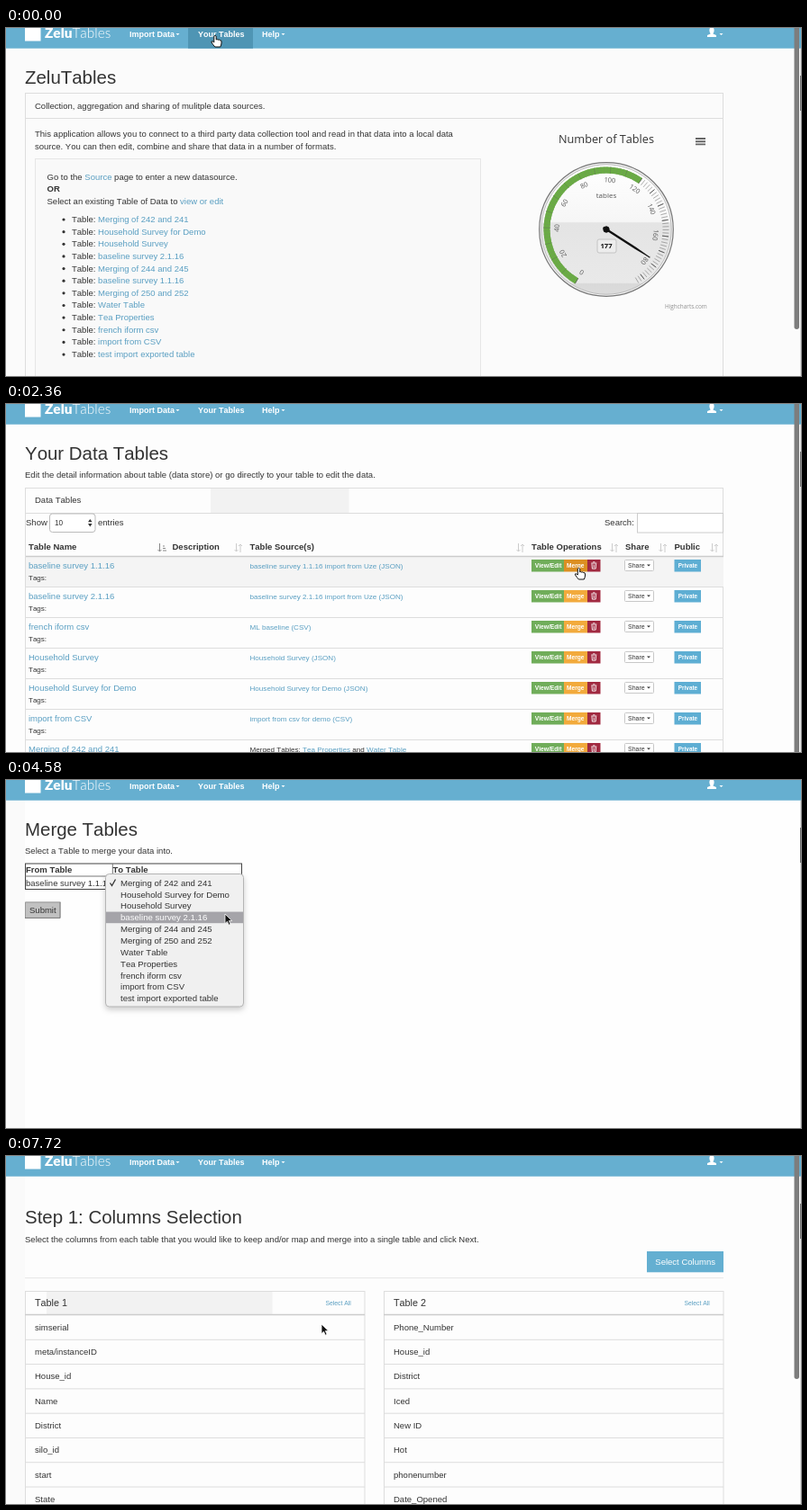
An HTML page for the animation above (8 s loop, 882 px wide and 387 px high).

```html
<!DOCTYPE html>
<html lang="en">
<head>
<meta charset="utf-8">
<title>ZeluTables</title>
<style>
html, body { margin: 0; width: 100%; height: 100%; overflow: hidden; background: #fdfdfd; }
svg { display: block; width: 882px; height: 387px; font: 9.53px "Liberation Sans", Arial, sans-serif; font-kerning: none; white-space: pre; }
.chart { font-family: "Open Sans", "Noto Sans", sans-serif; }
.logo { font-family: Lato, sans-serif; }
</style>
</head>
<body>
<svg id="stage" viewBox="0 0 882 387"></svg>
<script>
const INK = '#333', LINK = '#5a9fc2', BLUE = '#64afd1', LINE = '#ddd';
const stage = document.getElementById('stage');
const $ = id => document.getElementById(id);

const text = (x, y, s, fill = INK, size = 9.53, more = '') =>
  `<text x="${x}" y="${y}" fill="${fill}" font-size="${size}" ${more}>${s}</text>`;
const bold = (x, y, s, fill, size) => text(x, y, s, fill, size, 'font-weight="700"');
const rect = (x, y, w, h, fill, more = '') =>
  `<rect x="${x}" y="${y}" width="${w}" height="${h}" fill="${fill}" ${more}/>`;
const box = (x, y, w, h, stroke = LINE, fill = 'none', rx = 0) =>
  rect(x, y, w, h, fill, `stroke="${stroke}" rx="${rx}"`);
const path = (d, fill, more = '') => `<path d="${d}" fill="${fill}" ${more}/>`;
const rule = (d, stroke = LINE, width = 1) => path(d, 'none', `stroke="${stroke}" stroke-width="${width}"`);
const span = (s, fill = LINK) => `<tspan fill="${fill}">${s}</tspan>`;
const title = (y, s) => text(21, y, s, INK, 20.45);
const group = (id, s, more = '') => `<g id="${id}" ${more}>${s}</g>`;
const caret = (x, y, fill, r = 2) => path(`M${x} ${y}h${2 * r}l${-r} ${r}z`, fill);
const upDown = (x, y) => path(`M${x} ${y}l2.3-3.4 2.3 3.4zm0 1.8h4.6l-2.3 3.4z`, INK);
const list = (n, f) => Array.from({ length: n }, (_, i) => f(i)).join('');

function navbar() {
  return rect(0, 0, 882, 22.7, '#66afd0') +
    rect(202, 0, 72, 22.7, '#4f95b4', 'id="navHover"') +
    rect(21, 0, 17.5, 14.5, '#fff') +
    `<text x="43" y="11.3" fill="#fff" font-size="15.4" class="logo"><tspan font-weight="900">Zelu</tspan><tspan font-weight="300">Tables</tspan></text>` +
    bold(137, 9.7, 'Import Data', '#fff', 9) + caret(188.5, 6, '#fff') +
    bold(213, 9.7, 'Your Tables', '#fff', 9) +
    bold(284, 9.7, 'Help', '#fff', 9) + caret(305.5, 6, '#fff') +
    '<ellipse cx="783" cy="2.6" rx="2.6" ry="3.6" fill="#fff"/>' +
    path('M781.5 5h3v1.5l3.5 1.5v2h-10v-2l3.5-1.5z', '#fff') + caret(791.5, 6, '#fff') +
    rect(881, 23, 1, 364, '#d8d8d8') + rect(881, 53, 1, 39, '#666') +
    rect(874.5, -6, 5.5, 0, '#7d7d7d', 'rx="2.7" id="thumb"');
}

function gauge() {
  const cx = 666, cy = 224;
  const angle = v => -150 + v * 300 / 194.7;
  const at = (r, v) => {
    const a = angle(v) * Math.PI / 180;
    return `${(cx + r * Math.sin(a)).toFixed(2)} ${(cy - r * Math.cos(a)).toFixed(2)}`;
  };
  const ring = (r, fill, stroke, w = 1) =>
    `<circle cx="${cx}" cy="${cy}" r="${r}" fill="${fill}" stroke="${stroke}" stroke-width="${w}"/>`;
  const ticks = (n, step, color, w) =>
    rule(list(n, i => `M${at(62.5, i * step)}L${at(69.5, i * step)}`), color, w);
  const band = color => rule(`M${at(66, 0)}A66 66 0 1 1 ${at(66, 120)}`, color, 7);
  const labels = list(10, i => {
    const [x, y] = at(55, i * 20).split(' ');
    return text(0, 2.6, i * 20, '#555', 7.4,
      `text-anchor="middle" transform="translate(${x} ${y}) rotate(${angle(i * 20)})"`);
  });
  return `<defs><linearGradient id="dial" x2="0" y2="1">
    <stop offset="0" stop-color="#fff"/><stop offset=".44" stop-color="#f6f6f6"/>
    <stop offset=".45" stop-color="#e4e4e4"/><stop offset=".91" stop-color="#e9e9e9"/>
    <stop offset=".92" stop-color="#d9d9d9"/><stop offset="1" stop-color="#dcdcdc"/></linearGradient></defs>` +
    text(cx, 128, 'Number of Tables', INK, 12.7, 'text-anchor="middle"') +
    rule('M765 123h11m-11 3.2h11m-11 3.2h11', '#666', 1.9) +
    ring(74.3, '#f4f4f4', '#777', 1.2) + ring(72.2, 'url(#dial)', '#bbb') +
    band('#6aad45') + ticks(98, 2, '#777', .6) + ticks(20, 10, '#555', .9) + band('#6aad45b0') +
    labels + text(cx, 189, 'tables', '#555', 8, 'text-anchor="middle"') +
    box(656, 235, 21, 15, '#c4c4c4', '#ededed', 2) +
    bold(659.5, 245.3, '177', '#111', 7.6) +
    `<g transform="translate(${cx} ${cy}) rotate(${angle(177)})">${path('M-1.2 4V-38L-.4-57H.4L1.2-38V4z', '#111')}</g>` +
    ring(3.2, '#111', '#111') +
    text(731, 312.3, 'Highcharts.com', '#909090', 6.4);
}

function home() {
  const names = ['Merging of 242 and 241', 'Household Survey for Demo', 'Household Survey', 'baseline survey 2.1.16',
    'Merging of 244 and 245', 'baseline survey 1.1.16', 'Merging of 250 and 252', 'Water Table', 'Tea Properties',
    'french iform csv', 'import from CSV', 'test import exported table'];
  return rect(0, 0, 882, 387, '#fbfbfb') + title(62, 'ZeluTables') +
    box(21.5, 72.5, 774, 330) + rule('M21 100.5h775') +
    text(32, 89.7, 'Collection, aggregation and sharing of mulitple data sources.') +
    text(32, 121, 'This application allows you to connect to a third party data collection tool and read in that data into a local data') +
    text(32, 134.7, 'source. You can then edit, combine and share that data in a number of formats.') +
    box(32.5, 145.5, 494, 260, '#e6e6e6', '#f9f9f9') +
    text(45.5, 168.7, `Go to the ${span('Source')} page to enter a new datasource.`) +
    bold(45.5, 182.2, 'OR') +
    text(45.5, 195.8, `Select an existing Table of Data to ${span('view or edit')}`) +
    names.map((n, i) => {
      const y = 216 + i * 13.64;
      return `<circle cx="64" cy="${y - 3}" r="1.6" fill="${INK}"/>` + text(73, y, `Table: ${span(n)}`);
    }).join('') +
    group('gauge', gauge(), 'class="chart"');
}

function tableRow([name, source], i) {
  const y = 34 * i;
  const src = i < 6 ? span(source) : `Merged Tables: ${span('Tea Properties')} and ${span('Water Table')}`;
  return text(25, 182.7 + y, name, LINK) + text(25, 195.7 + y, 'Tags:', INK, 8) +
    text(270.5, 182.7 + y, src, INK, 8.1, `id="src${i}"`) +
    rect(583, 173 + y, 36, 13.5, '#70ad5a') + rect(619, 173 + y, 26, 13.5, '#f2aa3c', `id="merge${i}"`) +
    rect(645, 173 + y, 14.5, 13.5, '#a12a41') +
    bold(586.7, 182.3 + y, 'View/Edit', '#fff', 6.7) + bold(622, 182.3 + y, 'Merge', '#fff', 6.6) +
    rule(`M649.3 ${177 + y}h6m-4-1.2h2m-3.3 1.7l.4 5.6h3.8l.4-5.6m-2.3 1v3.5`, '#fff', .9) +
    box(686.5, 173.5 + y, 32, 12, '#c8c8c8', '#fff', 1) + text(690, 181.6 + y, 'Share', INK, 7) +
    caret(711, 178.5 + y, INK) +
    rect(741.5, 173 + y, 29.5, 13.5, '#5eaed3') + bold(745.8, 182.2 + y, 'Private', '#fff', 6.4) +
    rule(`M22 ${203.5 + y}h774`);
}

function tables() {
  const rows = [['baseline survey 1.1.16', 'baseline survey 1.1.16 import from Uze (JSON)'],
    ['baseline survey 2.1.16', 'baseline survey 2.1.16 import from Uze (JSON)'],
    ['french iform csv', 'ML baseline (CSV)'], ['Household Survey', 'Household Survey (JSON)'],
    ['Household Survey for Demo', 'Household Survey for Demo (JSON)'],
    ['import from CSV', 'import from csv for demo (CSV)'], ['Merging of 242 and 241', '']];
  const heads = [[25, 'Table Name'], [184.5, 'Description'], [270.5, 'Table Source(s)'], [583, 'Table Operations'],
    [687, 'Share'], [741.5, 'Public']];
  const sorter = x => rule(`M${x + 2.5} 155v9m-2-2l2 2 2-2M${x + 7} 165v-9m-2 2l2-2 2 2`, '#ccc');
  return rect(0, 0, 882, 387, '#fdfdfd') + title(62, 'Your Data Tables') +
    text(21, 82.3, 'Edit the detail information about table (data store) or go directly to your table to edit the data.') +
    rect(227, 94, 153.5, 27, '#f2f2f2') + box(21.5, 93.5, 774, 320) + rule('M21 121.5h775') +
    text(32, 110.2, 'Data Tables') +
    text(22, 135.3, 'Show') + box(48.5, 122, 50.5, 20.5, '#bbb', '#fff', 3) + text(54, 135, '10', INK, 8.2) +
    upDown(91, 131.3) + text(102, 135.3, 'entries') +
    text(664, 135.3, 'Search:') + box(700.5, 121.5, 95, 21.5, '#ccc', '#fff') +
    heads.map(([x, s]) => bold(x, 162, s)).join('') +
    rule('M170.5 155v9m-2-2l2 2 2-2M174 158h2m-2 2.5h3m-3 2.5h4', '#888') +
    [253, 566, 670, 724, 781].map(sorter).join('') +
    rect(22, 170, 774, 33.5, '#f4f4f4', 'id="rowHover"') + rule('M22 169.5h774', '#ccc', 1.3) +
    rows.map(tableRow).join('');
}

const options = ['Merging of 242 and 241', 'Household Survey for Demo', 'Household Survey', 'baseline survey 2.1.16',
  'Merging of 244 and 245', 'Merging of 250 and 252', 'Water Table', 'Tea Properties', 'french iform csv',
  'import from CSV', 'test import exported table'];
const STEP = 12.85;

function merge() {
  return rect(0, 0, 882, 387, '#fefefe') + rect(0, 0, 21, 387, '#fafafa') + title(62, 'Merge Tables') +
    text(21, 82.3, 'Select a Table to merge your data into.') +
    box(21.5, 93, 240, 28.5, '#444', '#fff') + rule('M118.3 93v28.5M21.5 107h240', '#777') +
    bold(22, 103.3, 'From Table') + bold(118.5, 103.3, 'To Table') +
    text(22, 117.6, 'baseline survey 1.1.16') +
    box(119.7, 108.3, 141, 12.4, '#aaa', '#fff', 2) +
    text(124.5, 117.6, '', INK, 9.53, 'id="choice"') + upDown(252, 113.4) +
    rect(21, 135.5, 39.5, 18.3, '#c1c1c1', 'id="submit"') +
    rule('M21.5 153.5V136h39', '#999') + rule('M21 153.4h39V136', '#777') + text(26, 147.8, 'Submit') +
    group('popup', box(110.5, 104.5, 153, 147.5, '#b5b5b5', '#f0f0f0', 4) +
      rect(111, 0, 152, STEP - .2, '#a5a4a9', 'id="mark"') +
      rule('M115.5 114.5l2 3 4-7', INK, 1.3) +
      options.map((s, i) => text(127, 117.7 + i * STEP, s, INK, 9.65, `id="opt${i}"`)).join(''),
      'style="filter:drop-shadow(0 3px 3px #0003)"');
}

function columns() {
  const panel = (x, name, items) => box(x + .5, 150.5, 376.5, 260) +
    rule(`M${x} 176.5h377`, '#ccc', 1.3) + text(x + 11, 166.5, name, INK, 10.8) +
    text(x + 333.5, 165.8, 'Select All', LINK, 6.8) +
    items.map((s, i) => text(x + 11, 193.9 + i * 27.29, s) + rule(`M${x} ${204.3 + i * 27.29}h377`)).join('');
  return rect(0, 0, 882, 387, '#fdfdfd') + rect(0, 0, 21, 387, '#fafafa') +
    title(75.3, 'Step 1: Columns Selection') +
    text(21, 95.8, 'Select the columns from each table that you would like to keep and/or map and merge into a single table and click Next.') +
    rect(711, 106, 85, 23.3, BLUE) + text(720.3, 120.9, 'Select Columns', '#fff') +
    rule('M21 135.7h775', '#e6e6e6') + rect(45, 151, 250.5, 25, '#f2f2f2') +
    panel(21, 'Table 1', ['simserial', 'meta/instanceID', 'House_id', 'Name', 'District', 'silo_id', 'start', 'State']) +
    panel(419, 'Table 2', ['Phone_Number', 'House_id', 'District', 'Iced', 'New ID', 'Hot', 'phonenumber', 'Date_Opened']);
}

stage.innerHTML = [home, tables, merge, columns].map((f, i) => group('page' + i, f())).join('') + navbar() +
  group('cursor',
    path('M0 0V10.6L2.5 8.3 4.2 12.2 6.1 11.4 4.4 7.6H7.8Z', '#111', 'id="arrow" stroke="#fff" stroke-width=".8"') +
    path('M-1.2 1.2Q0-.6 1.2 1.2V5Q2.2 4 3.2 5.2 4.4 4.4 5.2 5.6 7 5.2 7 7V9Q6.8 11 5.8 13H-.2Q-2 11-4 8-4.4 6.4-2.8 6.8L-1.2 8Z',
      '#fff', 'id="hand" stroke="#111"'));

// The picture only changes at these moments: [first, last, count], in whole hundredths of a second.
const ticks = [[0, 0, 1], [140, 290, 2], [890, 1920, 8], [2070, 2070, 1], [2360, 2360, 1], [2660, 2660, 1],
  [3260, 3840, 5], [4140, 4580, 4], [5180, 6220, 8], [6370, 6370, 1], [6670, 6670, 1], [7120, 7120, 1], [7570, 7720, 2]]
  .flatMap(([a, b, n]) => Array.from({ length: n }, (_, i) => n > 1 ? Math.floor((a + (b - a) * i / (n - 1)) / 10) * 10 : a));

// Pointer tip: [time, x, y]
const track = [[0, 232, 8], [740, 232, 8], [1030, 420, 178], [1180, 497, 181], [1920, 633, 183], [2360, 635.5, 182],
  [2660, 635.5, 182], [3260, 260, 160], [3550, 200, 114], [4000, 200, 114], [4580, 243, 149], [5180, 243, 149],
  [6220, 51.5, 139], [7120, 51.5, 139], [7720, 350, 187], [8000, 350, 187]];
const thumbHeight = [335, 400, 0, 248];

function pointer(t) {
  const i = Math.max(1, track.findIndex(k => k[0] >= t));
  const [a, b] = [track[i - 1], track[i]];
  const p = (t - a[0]) / (b[0] - a[0]);
  return [a[1] + (b[1] - a[1]) * p, a[2] + (b[2] - a[2]) * p];
}

const show = (id, on) => $(id).setAttribute('display', on ? 'inline' : 'none');
const fill = (id, color) => $(id).setAttribute('fill', color);

function draw(now) {
  const t = ticks.filter(k => k <= now % 8000).pop();
  const page = [140, 2660, 7120].filter(k => t >= k).length;
  const [x, y] = pointer(t);
  for (let i = 0; i < 4; i++) show('page' + i, i === page);
  show('navHover', y < 23);
  show('thumb', thumbHeight[page]);
  $('thumb').setAttribute('height', thumbHeight[page] + 6);

  show('rowHover', y > 170);
  const onLink = t >= 1030 && t < 1300;
  $('src0').setAttribute('text-decoration', onLink ? 'underline' : 'none');
  $('src0').firstChild.setAttribute('fill', onLink ? '#2f6c8c' : LINK);
  fill('merge0', x > 619 ? '#dc8f22' : '#f2aa3c');

  const open = t >= 3690 && t < 5300;
  const at = Math.max(0, Math.floor((y - 108) / STEP));
  show('popup', open);
  $('mark').setAttribute('y', 108 + at * STEP);
  options.forEach((_, i) => fill('opt' + i, i === at ? '#fff' : INK));
  $('choice').textContent = options[t < 5300 ? 0 : 3];
  fill('submit', t >= 6370 && t < 6670 ? '#adadad' : '#c1c1c1');

  const hand = y < 23 || page === 1 && x > 583 || page === 2 && x < 61;
  show('hand', hand);
  show('arrow', !hand);
  $('cursor').setAttribute('transform', `translate(${x} ${y})`);
  requestAnimationFrame(draw);
}
draw(0);
</script>
</body>
</html>
```
